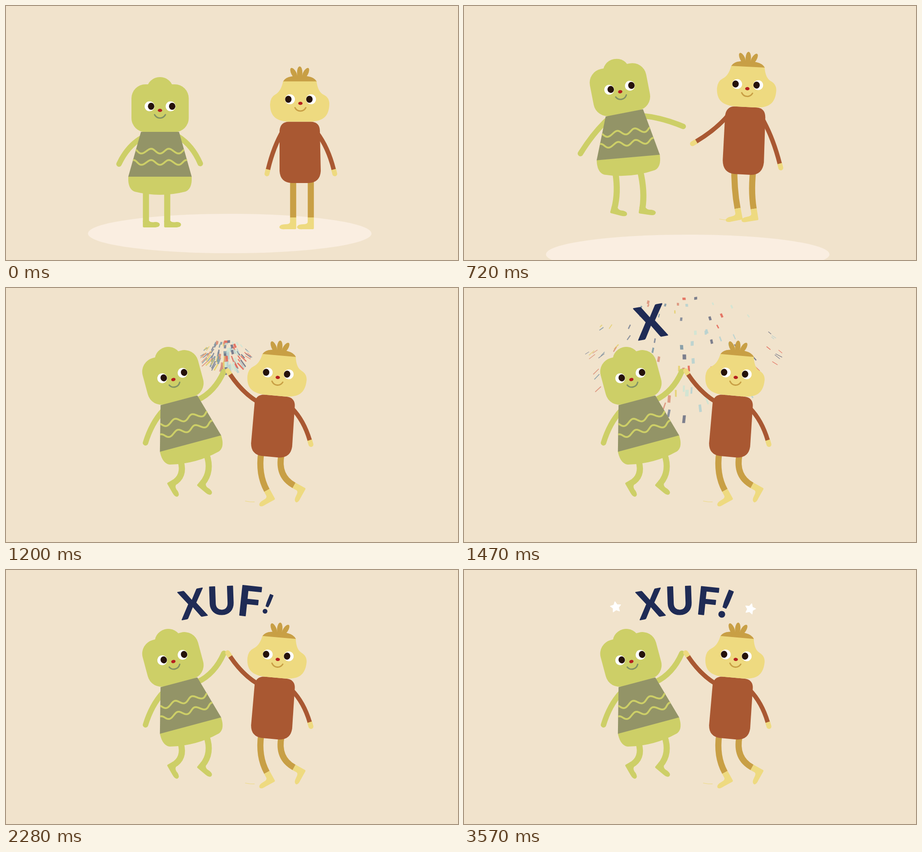
Recreate the animation shown at these times as an HTML page. Size 998 by 561 pixels, loop 4470 ms.

```html
<!DOCTYPE html>
<html lang="en">
<head>
<meta charset="utf-8">
<title>High five</title>
<style>
html, body { margin: 0; width: 100%; height: 100%; overflow: hidden; background: #f1e3cc; }
svg { display: block; width: 100vw; height: 100vh; }
text { font: 700 85px Lato, "Open Sans", sans-serif; text-anchor: middle; }
</style>
</head>
<body>
<svg id="stage" viewBox="0 0 998 561"></svg>
<script>
const LOOP = 4470, STEP = 30;
const LIME = '#cdcf67', MOSS = '#939467', CREAM = '#eeda80', OCHRE = '#c89f45',
      RUST = '#a95832', NAVY = '#1f2b55', INK = '#25120a', RED = '#b5201f';
const CONFETTI = ['#707386', '#8099a6', '#b7d2d0', '#dc927b', '#e3695a', '#e4d070', '#cfe4d4', '#7f8798'];
const stage = document.getElementById('stage');

const clamp = x => Math.max(0, Math.min(1, x));
const smooth = x => x * x * (3 - 2 * x);
const ramp = (t, from, to) => smooth(clamp((t - from) / (to - from)));
const rand = (i, k) => { const v = Math.sin(i * 12.9898 + k * 78.233) * 43758.5453; return v - Math.floor(v); };
const turn = (x, y, angle) => {
  const a = angle * Math.PI / 180, c = Math.cos(a), s = Math.sin(a);
  return [x * c - y * s, x * s + y * c];
};

// Standing, leaping, reaching, clapping
const TIMES = [360, 720, 960, 1150];

// Each pose: neck (x, y, lean), then the tip and bend of two arms and two legs
const GREEN = {
  shoulders: [[-40, 13], [40, 10]], hips: [[-31, 131], [16, 131]], spread: [0, 12],
  poses: [
    [[340, 278, 0], [249.5, 349, -12], [429, 348, 12], [309, 477, 0], [356, 477, 0]],
    [[354, 236, -5], [257, 326, -6], [484, 266, 7], [332, 447, 8], [394, 447, 8]],
    [[370.4, 238, -17], [279, 325, -8], [457, 142, -14], [375, 430, 7], [435.5, 421, 7]],
    [[381.8, 248, -15], [308, 342, -9], [481, 184, -16], [369, 431, 20], [434, 431, 18]]
  ]
};
const YELLOW = {
  shoulders: [[-36, 18], [38, 24]], hips: [[-14.5, 128], [24.5, 128]], spread: [-6, 0],
  poses: [
    [[648.5, 255.5, 0], [578.5, 361, -7], [723.5, 361, 9], [634, 467, 0], [673, 467, 0]],
    [[622, 223, 3], [513, 299, 8], [697, 348, 7], [604, 447, -5], [639.5, 448, -7]],
    [[604.4, 231.4, 7.6], [516, 168, 16], [683.5, 330, 8], [584, 436, -11], [627, 436, -12]],
    [[595, 237.7, 5], [495, 191, 10], [670.5, 336, 10], [576, 447, -14], [636, 436, -27]]
  ]
};

// Monotone cubic through the key values, at rest at both ends
function follow(values, t) {
  const last = TIMES.length - 1;
  if (t <= TIMES[0]) return values[0];
  if (t >= TIMES[last]) return values[last];
  const k = TIMES.findIndex(time => time >= t) - 1;
  const span = TIMES[k + 1] - TIMES[k], u = (t - TIMES[k]) / span;
  const slope = i => (values[i + 1] - values[i]) / (TIMES[i + 1] - TIMES[i]);
  const tangent = i => {
    if (i === 0 || i === last) return 0;
    const a = slope(i - 1), b = slope(i);
    return a * b > 0 ? 2 * a * b / (a + b) : 0;
  };
  return values[k] + (values[k + 1] - values[k]) * smooth(u) +
    span * u * (1 - u) * ((1 - u) * tangent(k) - u * tangent(k + 1));
}
const poseAt = (poses, t) => poses[0].map((part, i) => part.map((_, j) => follow(poses.map(p => p[i][j]), t)));
const lift = t => ramp(t, 360, 960);
const leap = t => ramp(t, 360, 720) - ramp(t, 720, 960);

const fill = (color, d) => `<path d="${d}" fill="${color}"/>`;
const line = (color, width, d, cap = 'butt') =>
  `<path d="${d}" fill="none" stroke="${color}" stroke-width="${width}" stroke-linecap="${cap}" stroke-linejoin="round"/>`;
const oval = (color, x, y, rx, ry = rx, extra = '') =>
  `<ellipse cx="${x}" cy="${y}" rx="${rx}" ry="${ry}" fill="${color}" ${extra}/>`;
const place = (x, y, angle, body, scale = 1) =>
  `<g transform="translate(${x} ${y}) rotate(${angle}) scale(${scale})">${body}</g>`;

// A curved limb from a joint on the body; heading is its direction at the tip, 0 pointing down
function limb([x, y, lean], joint, [tipX, tipY, bend], along) {
  const [jx, jy] = turn(...joint, lean), sx = x + jx, sy = y + jy;
  const dx = tipX - sx, dy = tipY - sy, len = Math.hypot(dx, dy);
  const cx = sx + dx * along + bend * dy / len, cy = sy + dy * along - bend * dx / len;
  return {
    path: `M${sx} ${sy}Q${cx} ${cy} ${tipX} ${tipY}`,
    heading: Math.atan2(cx - tipX, tipY - cy) * 180 / Math.PI
  };
}

function legs(who, t, body, tips, color, foot) {
  return tips.map((tip, i) => {
    const [hx, hy] = who.hips[i];
    const { path, heading } = limb(body, [hx + who.spread[i] * lift(t), hy], tip, .55);
    return line(color, 13.5, path) + place(tip[0], tip[1], heading, foot);
  }).join('');
}

const face = (left, right, eyeY, look, nose, lip) =>
  [left, right].map(x => oval('#fff', x, eyeY, 10.9) + oval(INK, x + look, eyeY, 7.1, 7.7)).join('') +
  oval(RED, nose, eyeY + 9, 4.8, 3.6) +
  line(lip, 3, `M${nose - 12} ${eyeY + 18.5}Q${nose - 8} ${eyeY + 26} ${nose} ${eyeY + 26}T${nose + 12} ${eyeY + 18.5}`, 'round');

const greenHead =
  `<rect x="-63" y="-105" width="126.5" height="105.5" rx="31" fill="${LIME}"/>` +
  oval(LIME, 0, -94, 29, 27) + face(-23, 23.5, -56.5, 3.4, 0, '#839263');
const greenFoot = fill(LIME, 'M-6.8-3V10Q-6.8 12-4.5 12H18Q30.5 12 30.5 5.5Q30 0 20 0Q10 2 6.8-3Z');
const greenSkirt = fill(LIME, 'M-70 98.5V107Q-69 127-56 132Q0 146 56 132Q69 127 70 107V98.5Z');

const yellowHead =
  fill(CREAM, 'M-36.5-90H37Q40-66 52-60Q65-54 65.5-40C65-12 52 0 20 0H-20C-52 0-65-12-65.5-38Q-65-54-54-60Q-41-67-36.5-90Z') +
  fill(OCHRE, 'M-36.5-89Q-32-98-18-100Q0-104 19-100Q32-98 37.5-89Z') +
  oval(OCHRE, 0, -108, 6, 14) +
  [-1, 1].map(s => oval(OCHRE, s * 13, -107, 5.6, 13, `transform="rotate(${s * 28} ${s * 13} -107)"`)).join('') +
  face(-21.5, 25, -49.5, -3.6, 1.5, OCHRE);
const yellowBody = fill(RUST, 'M-24.5 0H25Q44 1 44.5 20L46.5 109Q45 134 20 135.5H-18Q-43 134-44.5 109V20Q-43 1-24.5 0Z');
const yellowFoot = fill(CREAM, 'M6.8 0V24Q6.8 26 4.5 26H-18Q-30.5 27-30.5 21Q-29 15-17 15Q-7 15-6.8 10V0Z');

function drawGreen(t) {
  const [body, left, right, ...feet] = poseAt(GREEN.poses, t), [x, y, lean] = body;
  const tilt = -6 * leap(t);
  // A point of the dress: u runs across, depth runs down from the neck
  const cloth = (u, depth) => {
    const v = depth / 99, top = turn(42 * u, 0, tilt);
    return `${top[0] * (1 - v) + 70 * u * v} ${top[1] * (1 - v) + depth}`;
  };
  const wave = depth => {
    const half = 42 + 28 * depth / 99, pts = [];
    for (let u = -1; u <= 1; u += 1 / 24)
      pts.push(cloth(u, depth + 5.3 * Math.cos(u * half * Math.PI / 20)));
    return line(LIME, 4, 'M' + pts.join('L'));
  };
  const arms = [left, right].map((tip, i) =>
    line(LIME, 12, limb(body, GREEN.shoulders[i], tip, .45).path, 'round')).join('');
  return legs(GREEN, t, body, feet, LIME, greenFoot) + arms +
    place(x, y, lean, place(0, 0, tilt, greenHead) + greenSkirt +
      fill(MOSS, `M${cloth(-1, 0)}L${cloth(1, 0)}L${cloth(1, 99)}L${cloth(-1, 99)}Z`) + wave(42.5) + wave(67.5));
}

function drawYellow(t) {
  const [body, left, right, ...feet] = poseAt(YELLOW.poses, t), [x, y, lean] = body;
  const arms = [left, right].map((tip, i) => {
    const { path, heading } = limb(body, YELLOW.shoulders[i], tip, .45);
    return place(tip[0], tip[1], heading, line(CREAM, 10.8, 'M0 0V10', 'round')) + line(RUST, 9.8, path);
  }).join('');
  const [ankleX, ankleY] = feet[0];
  return line(CREAM, 1, `M${ankleX - 26 - 22 * lift(t)} ${ankleY + 23.5}q10 2.5 21 2`) +
    legs(YELLOW, t, body, feet, OCHRE, yellowFoot) + arms +
    place(x, y, lean, place(0, 0, 0, yellowBody, `1 ${1 + .1 * leap(t)}`) + yellowHead);
}

function drawBurst(t, start, cx, cy, size) {
  const u = (t - start) / 530;
  if (u <= 0 || u >= 1) return '';
  const spread = 1 - Math.pow(1 - u, 2.5), shrink = clamp((1 - u) * 2.6);
  let out = '';
  for (let i = 1; i <= 100; i++) {
    const side = (i % 2 ? -1 : 1) * Math.pow(rand(i, 2), 1.5), drop = rand(i, 3) * 2 - 1;
    const x = side * 245 * spread, y = drop * 152 * Math.sqrt(1 - side * side) * spread + 8 * u * u;
    const w = (1 + (1 - Math.abs(side)) * (2 + 5 * rand(i, 4))) * shrink;
    const h = (5 + 6 * (drop + 1) + 7 * Math.abs(side) * rand(i, 5)) * (.4 + .6 * shrink);
    out += `<rect x="${-w / 2}" y="${-h / 2}" width="${w}" height="${h}" fill="${CONFETTI[i % 8]}" opacity=".9" ` +
      `transform="translate(${x} ${y}) rotate(${-58 * side}) skewX(${rand(i, 6) * 16 - 8})"/>`;
  }
  return place(cx, cy, 0, out, size);
}

function drawLetter(t, glyph, start, x, y, angle) {
  const age = t - start;
  if (age <= 0) return '';
  const scale = age < 240 ? 1.15 * (1 - (1 - age / 240) ** 2) : 1.15 - .15 * ramp(age, 240, 600);
  return place(x, y, angle, `<text y="30.5" fill="${NAVY}" stroke="${NAVY}" stroke-width="2" stroke-linejoin="round">${glyph}</text>`, scale);
}

function drawStar(t, x, y, angle) {
  const u = clamp((t - 3240) / 330);
  if (!u) return '';
  const pts = Array.from({ length: 10 }, (_, i) => turn(0, i % 2 ? -6.2 : -12, i * 36).join(' '));
  const scale = 1.5 * ramp(u, 0, .55) - .5 * ramp(u, .55, 1);
  return place(x, y - 14 * Math.sin(Math.PI * u), angle,
    `<path d="M${pts.join('L')}Z" fill="#fff" stroke="#fff" stroke-width="1.5" stroke-linejoin="round"/>`, scale);
}

function render(t) {
  const sink = 46 * Math.pow(Math.max(0, t - 360) / 360, 2.4);
  stage.innerHTML =
    (sink < 105 ? oval('#faeee1', 494, 502.5 + sink, 313, 43.5) : '') +
    drawBurst(t, 1150, 485, 150, 1) +
    drawBurst(t, 1740, 730, 164, 1) +
    drawBurst(t, 2470, 240, 186, .85) +
    drawLetter(t, 'X', 1200, 411.5, 75, -10) +
    drawLetter(t, 'U', 1530, 476, 67.5, -2) +
    drawLetter(t, 'F', 1860, 538, 69, 6) +
    drawLetter(t, '!', 2190, 578.5, 75, 22) +
    drawStar(t, 335, 82, -8) + drawStar(t, 632, 86, 16) +
    drawGreen(t) + drawYellow(t);
}

const begin = performance.now();
function tick() {
  const t = (performance.now() - begin) % LOOP;
  render(Math.floor(t / STEP) * STEP);
  requestAnimationFrame(tick);
}
tick();
</script>
</body>
</html>
```
